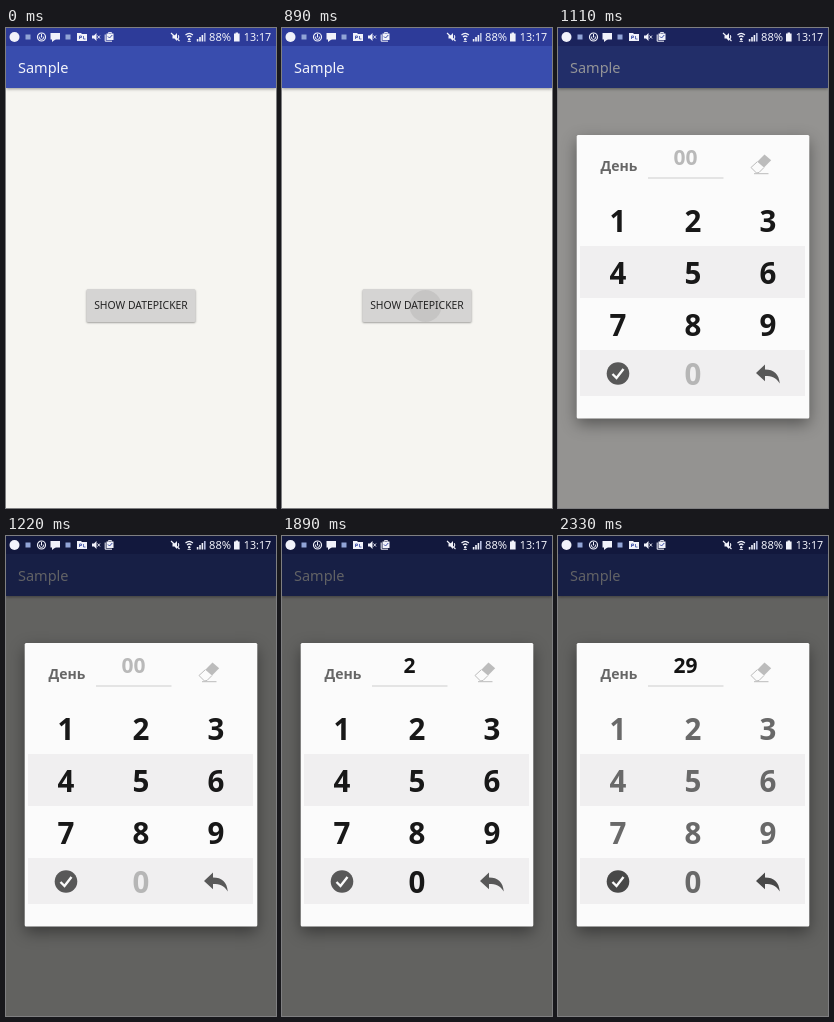
Write an HTML page with a canvas that moves like this. It is 270 px wide and 480 px high and loops after 2440 ms.

```html
<!DOCTYPE html>
<html lang="en">
<head>
<meta charset="utf-8">
<title>Date picker</title>
<style>
html, body { margin: 0; width: 100%; height: 100%; overflow: hidden; background: #f6f5f1; }
canvas { display: block; width: 270px; height: 480px; }
</style>
</head>
<body>
<canvas id="stage"></canvas>
<script>
const canvas = document.getElementById('stage');
const ctx = canvas.getContext('2d');
const dpr = window.devicePixelRatio || 1;
canvas.width = 270 * dpr;
canvas.height = 480 * dpr;

const LOOP = 2440, TICK = 1000 / 9;
const FONT = '"Noto Sans", "Open Sans", sans-serif';
const COLUMNS = [60, 135, 210];
const BASELINES = [204, 256, 308, 357];

function rect(x, y, w, h, color) {
  ctx.fillStyle = color;
  ctx.fillRect(x, y, w, h);
}

function poly(points, color) {
  ctx.beginPath();
  points.forEach(([x, y]) => ctx.lineTo(x, y));
  ctx.closePath();
  ctx.fillStyle = color;
  ctx.fill();
}

function disc(x, y, r, color) {
  ctx.beginPath();
  ctx.arc(x, y, r, 0, Math.PI * 2);
  ctx.fillStyle = color;
  ctx.fill();
}

function stroke(path, color, width) {
  ctx.strokeStyle = color;
  ctx.lineWidth = width;
  ctx.stroke(new Path2D(path));
}

function label(str, x, y, size, color, weight = 400, align = 'left') {
  ctx.font = `${weight} ${size}px ${FONT}`;
  ctx.textAlign = align;
  ctx.fillStyle = color;
  ctx.fillText(str, x, y);
}

const gray = v => `rgb(${v},${v},${v})`;

function withShadow(color, blur, dy, draw) {
  ctx.save();
  ctx.shadowColor = color;
  ctx.shadowBlur = blur * dpr;
  ctx.shadowOffsetY = dy * dpr;
  draw();
  ctx.restore();
}

function speaker(x, color) {
  poly([[x, 7.5], [x + 2, 7.5], [x + 4.5, 5], [x + 4.5, 13], [x + 2, 10.5], [x, 10.5]], color);
}

function drawStatusIcons() {
  const white = '#f1f2fa', blue = '#3548a4';
  disc(8.5, 9, 5, white);
  rect(19.5, 6.5, 5, 5, '#91a4d6');
  rect(59.5, 6.5, 5, 5, '#91a4d6');

  ctx.beginPath();
  ctx.arc(35.5, 9, 4, 0, Math.PI * 2);
  ctx.strokeStyle = white;
  ctx.lineWidth = 1.2;
  ctx.stroke();
  stroke('M35.5 6V9.5M33.8 8.5a2 2 0 1 0 3.4 0', white, 1);

  rect(44.5, 5, 9.5, 6.5, white);
  poly([[46, 11], [50, 11], [46, 14]], white);

  poly([[71, 5], [75, 5], [76, 6], [81, 6], [81, 13], [71, 13]], white);
  stroke('M73.5 11V8H75.5V9.5H73.5M77.5 8V11H79.5', blue, 0.8);

  speaker(86, white);
  stroke('M91.5 7.5L94 10.5M94 7.5L91.5 10.5', white, 0.9);

  stroke('M99.2 6.5V13.2H106', white, 1);
  rect(100.5, 5.5, 7, 6.5, white);
  stroke('M102.5 5.5V4.5H105.5V5.5', white, 0.9);
  stroke('M102 8.5L103.5 10L106.3 7', blue, 1);

  speaker(166.5, white);
  stroke('M165 5L173.5 13M172.3 7.2q1 1.8 0 3.6', white, 1.1);

  stroke('M179.5 7q3.7-3.4 7.4 0M181 9q2.2-2 4.4 0', white, 1.2);
  disc(183.2, 11.3, 1.2, white);
  stroke('M181.5 13.5H185', white, 0.8);

  for (let i = 0; i < 4; i++) {
    rect(190.8 + i * 2.4, 11 - i * 2, 1.6, 2.5 + i * 2, i < 3 ? white : '#b7bee0');
  }
  label('88%', 203, 13, 11.2, white);
  rect(229.6, 4.5, 2.4, 1.5, white);
  rect(228, 5.5, 5.6, 8, white);
  label('13:17', 237.8, 13, 10.7, white);
}

function drawScreen(ripple) {
  rect(0, 0, 270, 480, '#f6f5f1');
  withShadow('rgba(0,0,0,.4)', 3, 1, () => rect(0, 18, 270, 42, '#394dae'));
  rect(0, 0, 270, 18, '#2d3b99');
  label('Sample', 12, 45, 14.5, '#f4f5fb');

  withShadow('rgba(0,0,0,.35)', 2, 1, () => {
    ctx.beginPath();
    ctx.roundRect(80.5, 261, 109, 33, 1.5);
    ctx.fillStyle = '#d5d4d3';
    ctx.fill();
  });
  if (ripple > 0) {
    ctx.save();
    ctx.beginPath();
    ctx.rect(80.5, 261, 109, 33);
    ctx.clip();
    disc(143.5, 278, ripple, 'rgba(0,0,0,.07)');
    ctx.restore();
  }
  label('SHOW DATEPICKER', 135, 281, 10.4, '#222', 400, 'center');
}

function drawEraser() {
  const color = '#bcbcbc';
  poly([[206.5, 126.5], [213.2, 132.3], [206, 139.5], [199.3, 133.7]], color);
  stroke('M199.3 133.7L193 139.5L198.5 145L201 144.5L206 139.5M196 145.7H210.5', color, 1);
}

function drawActions(color) {
  disc(60, 345.5, 11.3, color);
  ctx.lineCap = 'butt';
  stroke('M54.5 346L58.5 350L65.5 341', '#fafafa', 2.4);
  ctx.fillStyle = color;
  ctx.fill(new Path2D('M198 345L207 336.5V341.5C216 341.5 221 346 221.8 355.5C218 349.5 214 348 207 348V353.2Z'));
}

function drawDialog(alpha, value, digitShade, zeroShade, actionShade) {
  ctx.save();
  ctx.globalAlpha = alpha;

  // The shadow is kept outside so that it never shows through the panel.
  ctx.save();
  const outside = new Path2D();
  outside.rect(0, 0, 270, 480);
  outside.rect(19, 107, 232, 283);
  ctx.clip(outside, 'evenodd');
  withShadow('rgba(0,0,0,.42)', 15, 6, () => rect(19, 107, 232, 283, '#000'));
  ctx.restore();

  ctx.beginPath();
  ctx.roundRect(18.7, 107, 232.6, 283.5, 1.5);
  ctx.fillStyle = '#fbfbfb';
  ctx.fill();
  rect(22, 218, 225, 52, '#f0eff0');
  rect(22, 322, 225, 46, '#f0eff0');

  label('День', 42.5, 142.5, 14, '#666', 600);
  label(value || '00', 127.5, 137, 21, value ? '#141414' : '#b9b9b9', 600, 'center');
  rect(90, 149.5, 75.5, 1, '#cecece');
  drawEraser();

  for (let n = 1; n <= 9; n++) {
    const i = n - 1;
    label(n, COLUMNS[i % 3], BASELINES[Math.floor(i / 3)], 29.5, gray(digitShade), 600, 'center');
  }
  label(0, COLUMNS[1], BASELINES[3], 29.5, gray(zeroShade), 600, 'center');
  drawActions(gray(actionShade));
  ctx.restore();
}

function draw(time) {
  const tick = Math.floor((time % LOOP + 3) / TICK);
  const ripple = tick >= 7 && tick <= 9 ? 8 + (tick - 7) * 8 : 0;
  const dim = tick < 10 ? 0 : tick === 10 ? 0.4 : 0.6;
  const alpha = tick < 9 ? 0 : tick === 9 ? 0.22 : 1;
  const value = tick < 16 ? '' : tick < 20 ? '2' : '29';
  const digitShade = tick < 20 ? 24 : tick === 20 ? 105 : 186;
  const zeroShade = tick < 16 ? 182 : tick === 16 ? 100 : tick < 20 ? 24 : digitShade;
  const actionShade = tick < 20 ? 88 : 72;

  ctx.setTransform(dpr, 0, 0, dpr, 0, 0);
  drawScreen(ripple);
  rect(0, 0, 270, 480, `rgba(0,0,0,${dim})`);
  drawStatusIcons();
  if (alpha) drawDialog(alpha, value, digitShade, zeroShade, actionShade);
}

let start;
function loop(now) {
  start ??= now;
  draw(Math.max(0, now - start));
  requestAnimationFrame(loop);
}
draw(0);
requestAnimationFrame(loop);
</script>
</body>
</html>
```
